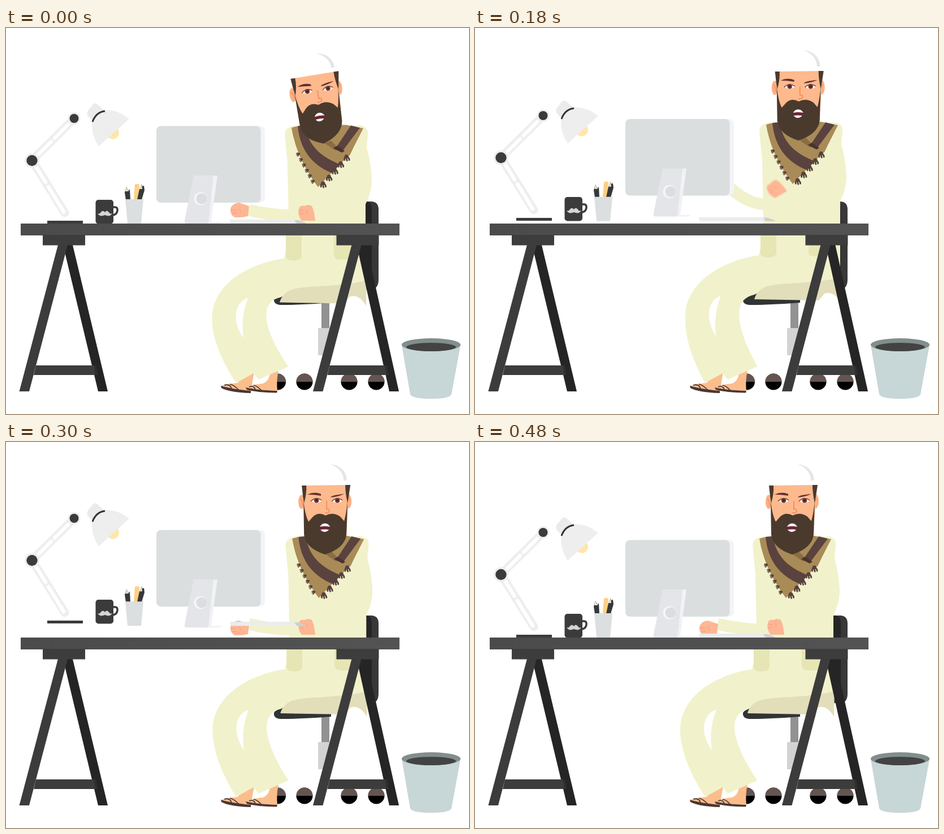
Animation of 819 by 683 pixels, one loop 0.54 s. Source, as an HTML page:

```html
<!DOCTYPE html>
<html lang="en">
<head>
<meta charset="utf-8">
<title>Man at a shaking desk</title>
<style>
  html, body { margin: 0; width: 100%; height: 100%; overflow: hidden; background: #fff; }
  svg { display: block; width: 819px; height: 683px; }
</style>
</head>
<body>
<svg viewBox="0 0 819 683" xmlns="http://www.w3.org/2000/svg">
  <defs>
    <g id="tassel" fill="none" stroke="#57413d" stroke-width="2.8" stroke-linecap="round">
      <circle r="2.2" cy="-2" fill="#57413d"/>
      <path d="M-2-2Q-5-1-5 3M-1 0L-1 5M1-1Q4 1 3 5"/>
    </g>
    <g id="wheel">
      <circle r="14.5" fill="#000"/>
      <path d="M-14.5 0a14.5 14.5 0 0 1 29 0z" fill="#655550"/>
    </g>
    <linearGradient id="top"><stop stop-color="#4b4b4b"/><stop offset="1" stop-color="#535353"/></linearGradient>
  </defs>

  <g id="chair">
    <path d="M634 307h13q12 1 12 14V445q0 17-13 17h-12z" fill="#383838"/>
    <path d="M634 307h5q8 2 8 14V425q0 14-13 18z" fill="#252525"/>
    <rect x="558" y="480" width="14" height="52" fill="#929292"/>
    <rect x="552" y="531" width="22" height="48" fill="#d3d3d3"/>
    <path d="M474 482Q473 477 480 474L492 469 575 472V486Q530 490 488 490 475 490 474 482z" fill="#313435"/>
    <use href="#wheel" x="480.500" y="626"/><use href="#wheel" x="528" y="626"/>
    <use href="#wheel" x="607" y="626"/><use href="#wheel" x="655" y="626"/>
  </g>

  <g id="feet">
    <path d="M381 633Q397 629 410 628L420 614 439 609 433 643Q405 643 383 636z" fill="#fcbd8d"/>
    <path d="M380 633Q399 639 433 642L433 646Q396 645 381 637z" fill="#493732"/>
    <path d="M425 635Q441 630 455 629 466 624 467 610L482 606Q478 624 480 642 448 643 426 638z" fill="#fcbd8d"/>
    <path d="M424 636Q445 641 480 642L479 645.500Q444 645 426 640z" fill="#493732"/>
    <path d="M386 632Q396 629 399 638M396 630Q404 632 412 641M430 635Q439 632 441 640M438 632Q446 634 452 642" fill="none" stroke="#493732" stroke-width="1.800"/>
  </g>

  <path id="legs" fill="#f1f2cb" fill-rule="evenodd"/>

  <g id="torso">
    <path d="M482 480Q487 461 512 454L600 447 636 432 635 486Q622 464 606 470L596 482z" fill="#e2deba"/>
    <path d="M491 181Q492 170 510 167H626Q640 171 638 183L636 206Q645 238 645 268 643 290 634 306V441Q610 449 540 452 503 454 490 464V402Q499 365 498 330L496 235z" fill="#f1f2cb"/>
    <path d="M493 358H521V398Q520 406 507 406 493 406 493 398zM578 358H612V404H590Q578 404 578 396z" fill="#e6e6b5"/>
    <path d="M503 171Q515 167 530 166H600L630 172 606 219 588 236 550 276Q512 226 503 171z" fill="#a98b57"/>
    <path d="M514 168L527 167C533 205 556 222 589 236L574 251C536 235 518 207 514 168z" fill="#5a423f"/>
    <path d="M540 178Q548 193 606 220L612 207 561 198z" fill="#a98b57"/>
    <path d="M561 198L573 194 590 211 580 211z" fill="#8b6d42"/>
    <path d="M608 167L624 171 592 214 577 207 584 203z" fill="#5a423f"/>
    <path d="M577 207L584 203 597 212 592 215z" fill="#49332f"/>
    <g id="fringe"></g>
  </g>

  <g id="head">
    <path d="M571 39Q597 43 600 67 597 70 594 68 594 49 571 39z" fill="#e4e5e9"/>
    <ellipse cx="519.500" cy="106" rx="5.500" ry="12.500" fill="#fbb084"/>
    <ellipse cx="602.500" cy="105" rx="5.500" ry="12.500" fill="#fbb084"/>
    <path d="M517 101q5 3 4 12M605 100q-5 3-4 12" fill="none" stroke="#ee8c62" stroke-width="1.200"/>
    <path d="M522 77L604 76 599 160H527z" fill="#feb98d"/>
    <path d="M520 77L528 77Q529 91 524 108L522 96zM606 76L597 76Q597 91 601 108L603 96z" fill="#4a3a2d"/>
    <path d="M523 104Q526 130 532 141L539 133Q549 123 562 130 575 123 588 132L595 140Q599 125 601 104L599 164Q596 188 561 199 527 188 524 164z" fill="#4a3a2d"/>
    <path d="M551 151Q555 148 561 148 568 148 570 152 567 158 560 158 554 158 551 151z" fill="#6d2536"/>
    <path d="M552 150Q555 144 561 144 567 144 570 150 561 148 552 150zM553 155Q561 154 568 155 565 159 560 159 556 159 553 155z" fill="#fff"/>
    <path d="M564 104L564 119Q569 117 569 122 567 127 561 125" fill="none" stroke="#ed8258" stroke-width="1.400"/>
    <g id="eye">
      <path d="M537 105Q545 97 555 104 547 111 537 105z" fill="#fff"/>
      <circle cx="546" cy="103.500" r="4.300" fill="#743b3b"/>
      <circle cx="546" cy="103.500" r="2" fill="#421f23"/>
      <path d="M536 105Q545 96 555 103" fill="none" stroke="#5b332d" stroke-width="1.200"/>
    </g>
    <use href="#eye" x="37" y="0"/>
    <path d="M530 93Q542 87 554 92L554 95Q542 93 530 93zM571 98Q572 94 595 92 584 97 571 98z" fill="#62302f"/>
  </g>

  <path id="arm" fill="none" stroke="#f1f2cb" stroke-width="21"/>
  <g id="leftHand">
    <path d="M397 320Q400 310 412 309L430 315 428 333Q415 336 404 335 396 330 397 320z" fill="#feb694"/>
    <path d="M398 322l9 1M400 328l8 0M411 320q5 2 3 7" fill="none" stroke="#f39b78" stroke-width="1"/>
  </g>

  <g id="monitor">
    <rect x="274" y="173.500" width="184" height="135.500" rx="9" fill="#f3f3f8"/>
    <rect x="266" y="173.500" width="184.500" height="135.500" rx="8" fill="#dadedf"/>
    <path d="M366 261H374L363 343H380V346H340z" fill="#f1f2f6"/>
    <path d="M332 261H367L358 346H318Q315 345 316 340z" fill="#e4e5e9"/>
    <circle cx="344" cy="302" r="11.500" fill="#f5f5f8"/>
    <circle cx="346" cy="302" r="9.500" fill="#dadee0"/>
  </g>

  <g id="lamp">
    <rect x="73" y="341" width="63" height="5" fill="#3b3b3b"/>
    <g stroke-linecap="round" fill="none">
      <path d="M46 234L104 327M46 234L121 160" stroke="#eee" stroke-width="15"/>
      <path d="M54 247L70 273M75 281L102 325M57 224L80 201M86 195L110 171" stroke="#fff" stroke-width="6.500"/>
    </g>
    <circle cx="46" cy="234.500" r="13" fill="#eee"/><circle cx="46" cy="234.500" r="9.700" fill="#3b3b3b"/>
    <circle cx="120.500" cy="160" r="11" fill="#eee"/><circle cx="120.500" cy="160" r="8" fill="#3b3b3b"/>
    <path d="M145 146L154 135Q158 131 163 136L175 147 154 166 145 156Q142 151 145 146z" fill="#ebebeb"/>
    <circle cx="189" cy="185.500" r="11" fill="#ffe6a8"/>
    <path d="M152 168Q159 148 177 145 202 146 217.500 161L164 209.500Q151 190 152 168z" fill="#eee"/>
    <path d="M153 166Q159 149 175 147" fill="none" stroke="#333" stroke-width="3"/>
  </g>

  <g id="mug">
    <path d="M188 317H193Q197.500 317 197 323 196 331 188 331" fill="none" stroke="#3b3b3b" stroke-width="3.600"/>
    <rect x="158.500" y="304" width="31.500" height="42.500" rx="5" fill="#3b3b3b"/>
    <path d="M175 326Q171 321 167 327 165 330 162 328 166 335 175 331 184 335 188 328 184 330 182 326 178 321 175 326z" fill="#d4d4d4"/>
  </g>

  <g id="cup">
    <path d="M228 277Q232 275 236 277L234 304H226z" fill="#fdd083"/>
    <path d="M210 291L213 281 217 288 219 285 220 304H212zM232 304L236 285 240 276 241 280 244 279 245 287 240 304z" fill="#37383a"/>
    <path d="M211 289L213 281 217 289zM236 285L240 276 241 285z" fill="#e9e3c8"/>
    <path d="M211 303H243L239 346H215z" fill="#dbdfe0"/>
  </g>

  <g id="rightHand">
    <path d="M518 320Q520 313 528 315L533 313 540 314Q545 320 547 341H523Q515 331 518 320z" fill="#feb694"/>
    <path d="M519 322l7 2M519 328l7 1M530 321q4 2 2 7" fill="none" stroke="#f39b78" stroke-width="1"/>
  </g>

  <g id="keys">
    <path d="M396 339H511L516 346H398Q396 344 396 339z" fill="#ebecec"/>
    <path d="M510 340H518L530 344.500V346H514z" fill="#cdd0d1"/>
  </g>

  <g id="desk">
    <rect x="26" y="346" width="670" height="21" fill="url(#top)"/>
  </g>

  <g id="bin">
    <path d="M700 561L715 648Q718 656 752 656 785 656 788 648L804 561z" fill="#c7d6d6"/>
    <ellipse cx="752" cy="560.500" rx="52" ry="11.500" fill="#828e8b"/>
    <ellipse cx="752" cy="564.500" rx="44" ry="7.500" fill="#434343"/>
  </g>
</svg>
<script>
const LOOP = 540, STEP = 30, LAST = 480;
const $ = id => document.getElementById(id);

// Tracks: rows of [time, value, value, ...], linear in between.
const tracks = {
  body: [[0, 2, 5.5], [120, 9, 2.5], [180, 12, 0], [240, 9, 0], [300, 3.3, 0], [360, 0, 0]],
  head: [[0, 1, 5.5, -8.5], [120, 8.5, 1.8, -2.2], [180, 10.7, 0, 0], [240, 7.7, 0, 0], [300, 3.2, 0, 0], [360, 0, 0, 0]],
  // wrist x, y, bend x, y, elbow y, extra hand drop
  arm: [[0, 429, 322, 470, 332, 332, 0], [120, 447, 215, 464, 295, 294, 0], [180, 430, 262, 475, 312, 312, 0],
    [240, 429, 315, 470, 325, 326, 0], [300, 429, 322, 470, 332, 332, 7], [360, 429, 322, 470, 332, 332, 11], [480, 429, 322, 470, 332, 332, 7]],
  fist: [[0, 0, 0], [120, -37, -45], [180, -43, -30], [240, -21, 0], [300, 0, 0]],
  monitor: [[120, 0], [240, -25], [450, 0]],
  lamp: [[150, 0], [300, -25], [480, 0]],
  cup: [[150, 0], [330, -25], [480, 0]]
};

function at(rows, t) {
  const i = rows.findIndex(r => r[0] > t);
  if (i < 0) return rows[rows.length - 1].slice(1);
  if (i === 0) return rows[0].slice(1);
  const a = rows[i - 1], b = rows[i], k = (t - a[0]) / (b[0] - a[0]);
  return a.slice(1).map((v, n) => v + (b[n + 1] - v) * k);
}

const move = (id, x, y, rest = "") => $(id).setAttribute("transform", `translate(${x} ${y})${rest}`);

// Hips follow the body, knees follow partly, cuffs stay put.
function legsPath(dx, dy) {
  const p = (x, y, k) => `${x + dx * k} ${y + dy * k} `;
  return `M${p(500, 401, 1)}C${p(440, 406, 1)}${p(363, 443, .8)}${p(363, 510, .75)}` +
    `C${p(363, 545, .6)}${p(381, 588, .3)}407 628L438 611 447 622 499.5 599` +
    `C${p(480, 570, .3)}${p(459, 532, .6)}${p(459, 504, .7)}Q${p(459, 478, .7)}${p(484, 472, .8)}L${p(520, 455, 1)}Z` +
    `M${p(427, 474, .65)}C${p(402, 481, .8)}${p(397, 515, .8)}${p(419, 545, .6)}Q${p(413, 508, .7)}${p(427, 474, .65)}Z`;
}

function trestle(x, cut) {
  const poly = (fill, pts) => `<polygon fill="${fill}" points="${pts}"/>`;
  const r = 180 - cut;
  return `<g transform="translate(${x})">` +
    poly("#252525", `100,380 117,380 ${r},643 ${r - 17},643`) +
    poly("#3c3c3c", `93,380 110,380 41,643 23.5,643`) +
    poly("#3c3c3c", `53,597 ${159 - cut},597 ${162 - cut},614 49,614`) +
    poly("#2f2f2f", `${155 - cut},597 ${159 - cut},597 ${162 - cut},614 ${158 - cut},614`) +
    `<rect x="65" y="366" width="75" height="18.500" fill="#3d3d3d"/></g>`;
}

function tassels() {
  const use = (x, y, s, turn) => `<use href="#tassel" transform="translate(${x} ${y}) rotate(${turn}) scale(${s})"/>`;
  let out = "";
  for (let i = 0; i < 5; i++) out += use(601 - 10.4 * i, 224 + 11.8 * i, 1, -15);
  for (let i = 0; i < 6; i++) out += use(515 + 5.2 * i, 218 + 9.6 * i, .6, 55);
  return out;
}

$("desk").innerHTML += trestle(0, 0) + trestle(519.5, 4.5);
$("fringe").innerHTML = tassels();

function draw(t) {
  const [bx, by] = at(tracks.body, t);
  move("torso", bx, by);
  $("legs").setAttribute("d", legsPath(bx, by));

  const [hx, hy, turn] = at(tracks.head, t);
  move("head", hx, hy, ` rotate(${turn} 561 199)`);

  const [wx, wy, cx, cy, ey, drop] = at(tracks.arm, t);
  $("arm").setAttribute("d", `M${wx} ${wy}Q${cx} ${cy} 514 ${ey}`);
  move("leftHand", wx - 429, wy - 322 + drop);

  const [lift, twist] = at(tracks.fist, t);
  move("rightHand", 0, lift, ` rotate(${twist} 532 327)`);
  $("rightHand").style.filter = lift < 0 ? "blur(1.1px)" : "none";

  move("monitor", 0, at(tracks.monitor, t)[0]);
  const lampY = at(tracks.lamp, t)[0], cupY = at(tracks.cup, t)[0];
  move("lamp", 0, lampY);
  move("mug", 0, lampY);
  move("cup", 0, cupY);
  move("keys", 0, cupY);
}

const start = performance.now();
function tick(now) {
  const t = Math.max(0, now - start) % LOOP;
  draw(Math.min(LAST, Math.floor(t / STEP) * STEP));
  requestAnimationFrame(tick);
}
draw(0);
requestAnimationFrame(tick);
</script>
</body>
</html>
```
